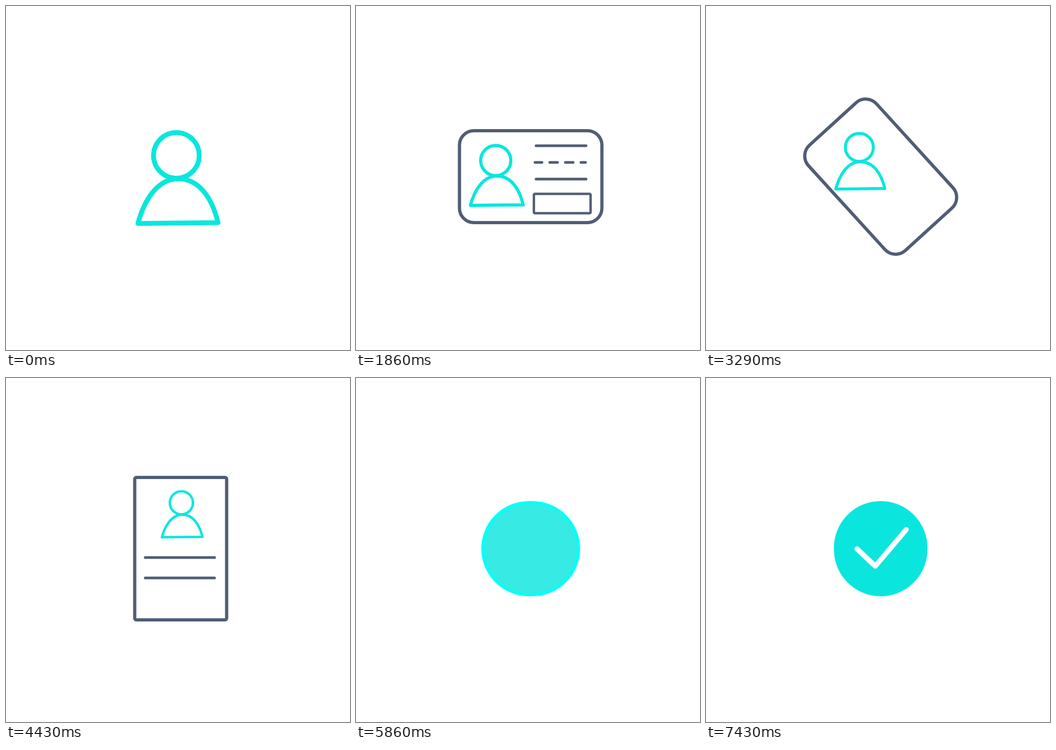
Recreate the animation shown at these times as an HTML page. Size 640 by 640 pixels, loop 8000 ms.

```html
<!DOCTYPE html>
<html lang="en">
<head>
<meta charset="utf-8">
<title>Identity check</title>
<style>
  html, body { margin: 0; width: 100%; height: 100%; overflow: hidden; background: #fff; }
  svg { display: block; width: 100%; height: 100%; }
  #stage * { fill: none; stroke-linecap: round; stroke-linejoin: round; }
  .slate { stroke: #505e75; stroke-width: 5; }
  .cyan { stroke: #0ae6de; stroke-width: 9; }
  #stage #sparks circle { fill: #0ae6de; }
</style>
</head>
<body>
<svg id="stage" viewBox="0 0 640 640">
  <g class="slate">
    <line id="row0" x1="335" y1="260" y2="260"/>
    <line id="row1" x1="333" y1="291" y2="291" stroke-dasharray="14.5 14.5" stroke-dashoffset="1.5"/>
    <line id="row2" x1="335" y1="322" y2="322"/>
    <path id="box" transform="translate(383.7 367.5)" stroke-width="4.5" pathLength="100"/>
    <line id="text0" x1="259" y1="334" y2="334"/>
    <line id="text1" x1="259" y1="372" y2="372"/>
  </g>
  <g id="person" class="cyan">
    <path id="head" pathLength="100" d="M42.5 0A42.5 42.5 0 1 1 -42.5 0A42.5 42.5 0 1 1 42.5 0"/>
    <path id="body" pathLength="100" d="M3 43.5C-35 43.5 -60 83 -71.5 126.5L77.5 125C66 78 42 43.5 3 43.5"/>
  </g>
  <g id="sparks" transform="translate(325 317.5)"></g>
  <path id="card" stroke-width="6" pathLength="100"/>
  <path id="check" d="M281 318L315 350L372.5 282" stroke="#fff" stroke-width="9.5" pathLength="100"/>
</svg>
<script>
const LOOP = 8000, STEPS = 112;
const SLATE = [80, 94, 117], BRIGHT = [4, 255, 246], CYAN = [10, 230, 222];
const $ = id => document.getElementById(id);
const clamp = v => Math.min(1, Math.max(0, v));
const lerp = (a, b, p) => a + (b - a) * p;
const mix = (a, b, p) => a.map((v, i) => lerp(v, b[i], p));

let now = 0;
const linear = (start, end) => clamp((now - start) / (end - start));
const ease = (start, end) => { const p = linear(start, end); return p * p * (3 - 2 * p); };

// Rounded rectangle around the origin, running clockwise from its upper right side.
function roundRect(w, h, r) {
  const x = w / 2, y = h / 2, arc = `A${r} ${r} 0 0 1 `;
  return `M${x} ${r - y}V${y - r}${arc}${x - r} ${y}H${r - x}${arc}${-x} ${y - r}` +
    `V${r - y}${arc}${r - x} ${-y}H${x - r}${arc}${x} ${r - y}`;
}

function show(el, p) {
  el.style.display = p > 0.001 ? "" : "none";
}

function trim(el, p) {
  show(el, p);
  el.setAttribute("stroke-dasharray", p < 1 ? `${100 * p} 300` : "none");
}

function growLine(id, from, to, p) {
  show($(id), p);
  $(id).setAttribute("x2", lerp(from, to, p));
}

const sparks = [
  [-249, -28], [249, 22], [-168, -118], [150, -147],
  [-118, 122], [82, 165], [-58, -138], [188, 108]
].map(([x, y], i) => {
  const el = document.createElementNS("http://www.w3.org/2000/svg", "circle");
  $("sparks").append(el);
  return { el, x, y, size: 6 + i % 3 };
});

function drawPerson() {
  const enter = ease(0, 800), erase = 1 - ease(5214, 5770);
  const x = lerp(lerp(317, 260, enter), 326.3, ease(2870, 3860));
  const y = lerp(lerp(278, 287.5, enter), 232.2, ease(2870, 3770));
  const scale = lerp(lerp(1, 0.66, enter), 0.506, ease(2870, 4000));
  $("person").setAttribute("transform", `translate(${x} ${y}) scale(${scale})`);
  trim($("head"), erase);
  trim($("body"), erase);
}

function drawText() {
  const hide = ease(2510, 2900);
  [428, 427, 428].forEach((end, i) =>
    growLine("row" + i, i === 1 ? 333 : 335, end, ease(880 + i * 100, 1460 + i * 100) - hide));
  trim($("box"), ease(1000, 1790) - hide);

  const erase = ease(5214, 5770);
  growLine("text0", 259, 388, ease(3640, 4200) - erase);
  growLine("text1", 259, 388, ease(3800, 4400) - erase);
}

function drawCard() {
  const turn = ease(2870, 3670), back = ease(4980, 5700), fill = ease(5400, 6030);
  const width = lerp(265, 168, ease(5357, 5980));
  const radius = Math.min(lerp(lerp(27, 3, ease(3290, 3800)), 85.5, back), width / 2);
  const color = mix(mix(SLATE, BRIGHT, ease(5400, 5857)), CYAN, ease(5857, 6200));
  const card = $("card");
  card.setAttribute("d", roundRect(width, 171, radius));
  card.setAttribute("transform", `translate(325 317.5) rotate(${90 * (turn - back)})`);
  card.style.stroke = `rgb(${color})`;
  card.style.fill = `rgba(${CYAN}, ${fill})`;
  trim(card, linear(0, 1800));
}

function drawSparks() {
  const t = linear(6100, 7400), out = 1 - (1 - t) ** 3;
  for (const { el, x, y, size } of sparks) {
    el.setAttribute("cx", x * out);
    el.setAttribute("cy", y * out);
    el.setAttribute("r", t > 0 ? size * (1 - t) : 0);
  }
}

function render(time) {
  const step = LOOP / STEPS;
  now = Math.floor((time % LOOP) / step) * step;
  drawPerson();
  drawText();
  drawSparks();
  drawCard();
  trim($("check"), ease(6000, 6600));
}

$("box").setAttribute("d", roundRect(105.5, 36, 2));
const begin = performance.now();
(function tick() {
  render(performance.now() - begin);
  requestAnimationFrame(tick);
})();
</script>
</body>
</html>
```
